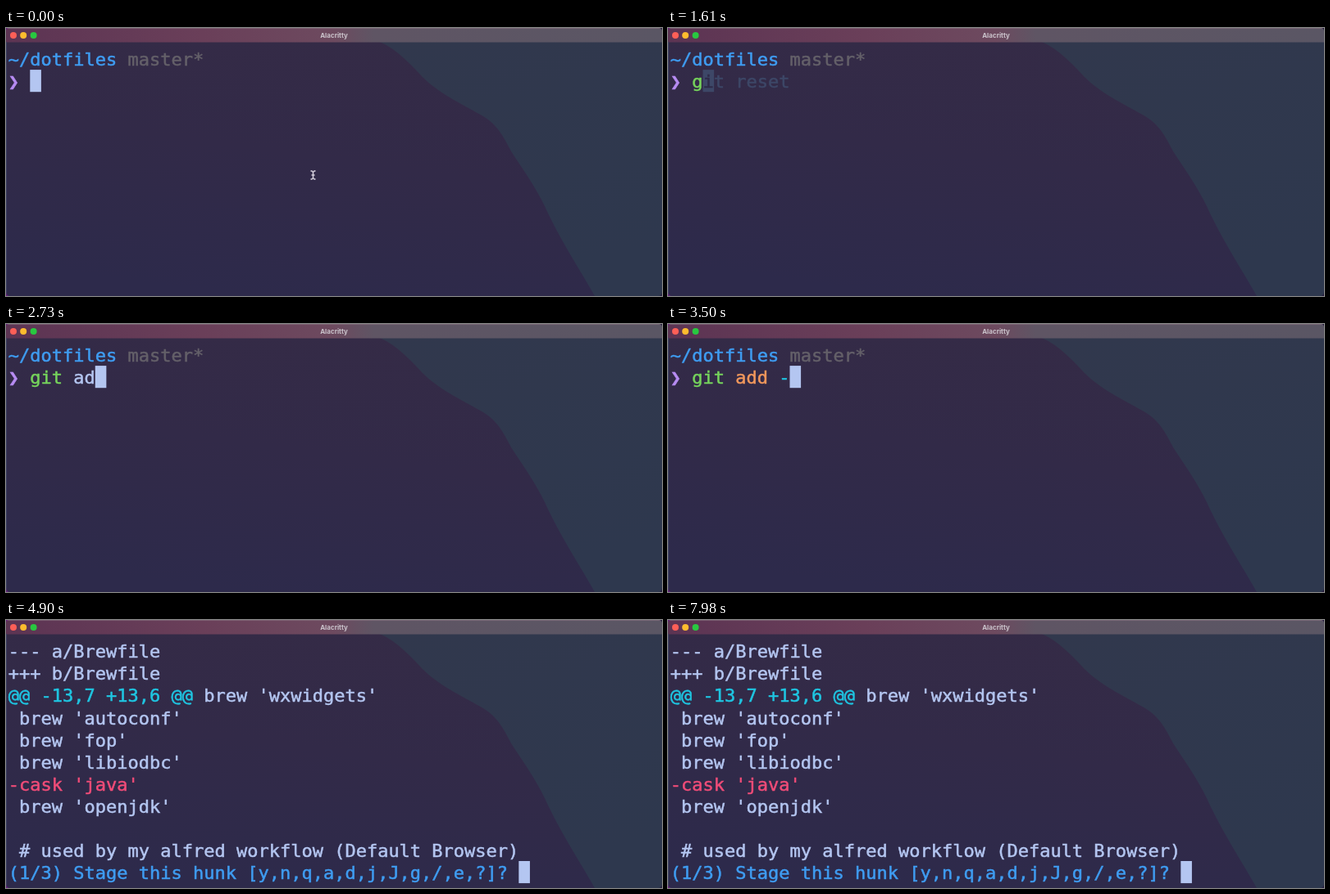
An HTML page for the animation above (8 s loop, 800 px wide and 328 px high).

```html
<!DOCTYPE html>
<html lang="en">
<head>
<meta charset="utf-8">
<title>Terminal</title>
<style>
  html, body { margin: 0; width: 100%; height: 100%; overflow: hidden; background: #302a49; }
  svg { display: block; width: 800px; height: 328px; }
  text { white-space: pre; }
  .term { font: 22px "DejaVu Sans Mono", "Noto Sans Mono", "Liberation Mono", monospace; font-variant-ligatures: none; fill: currentColor; }
  /* a thin outline gives a medium weight */
  .term text { stroke: currentColor; stroke-width: .5; }
  .title { font: 700 8px Inter, "Liberation Sans", sans-serif; fill: #cbc4cc; text-anchor: middle; }
  .fg { color: #b4c6f1; }
  .blue { color: #3f9df2; }
  .dim { color: #646069; }
  .mark { color: #b78cf2; }
  .cmd { color: #76d45c; }
  .sub { color: #f2985c; }
  .opt { color: #1fc6e2; }
  .red { color: #f04c78; }
  .hint { color: #3d4767; }
  .under { color: #2f2b49; }
  .pointer { fill: none; stroke: #d4cedb; stroke-width: 1.5; }
</style>
</head>
<body>
<svg viewBox="0 0 800 328">
  <defs>
    <linearGradient id="slope" x1=".7" y1="0" x2=".35" y2="1">
      <stop offset="0" stop-color="#352b46"/>
      <stop offset=".5" stop-color="#322a48"/>
      <stop offset="1" stop-color="#2d2a4b"/>
    </linearGradient>
    <linearGradient id="sky" x1="0" y1="0" x2=".3" y2="1">
      <stop offset="0" stop-color="#31384d"/>
      <stop offset="1" stop-color="#2e384e"/>
    </linearGradient>
    <linearGradient id="bar">
      <stop offset="0" stop-color="#5c3453"/>
      <stop offset=".3" stop-color="#6a3f59"/>
      <stop offset=".5" stop-color="#6d4a5f"/>
      <stop offset=".56" stop-color="#5f5564"/>
      <stop offset="1" stop-color="#5a5664"/>
    </linearGradient>
  </defs>
  <rect width="800" height="328" fill="url(#slope)"/>
  <path fill="url(#sky)" d="M456 17C478 27 494 45 508 60C530 82 562 96 582 108C603 121 609 139 618 154C634 178 645 194 657 218C675 258 700 296 718 328H800V17Z"/>
  <rect width="800" height="17.5" fill="url(#bar)"/>
  <rect width="800" height="1" fill="#8a7483" opacity=".6"/>
  <rect y="17" width="1" height="311" fill="#3d4264"/>
  <path fill="#65207c" d="M0 0H4Q0 0 0 4ZM0 328H5Q0 328 0 322Z"/>
  <path fill="#251c3d" d="M800 0H796Q800 0 800 4ZM800 328H795Q800 328 800 322Z"/>
  <circle cx="9" cy="9" r="4" fill="#fe5f57"/>
  <circle cx="21.2" cy="9" r="4" fill="#febc2e"/>
  <circle cx="33.6" cy="9" r="4" fill="#28c840"/>
  <text class="title" x="400" y="11.5">Alacritty</text>
  <g id="screen" class="term"></g>
  <path id="pointer" class="pointer" d="M371.5 175H373L374.5 176.5L376 175H377.5M374.5 176V184M371.5 185H373L374.5 183.5L376 185H377.5M372.5 180H376.5"/>
</svg>
<script>
const LOOP = 8000, CELL_W = 13.245, CELL_H = 27.1, LEFT = 2.8, TOP = 24, BASE = 22.2;
const TYPING_START = 1610;
const screen = document.getElementById('screen');
const pointer = document.getElementById('pointer');

function add(parent, name, attrs, text = '') {
  const node = document.createElementNS('http://www.w3.org/2000/svg', name);
  for (const key in attrs) node.setAttribute(key, attrs[key]);
  node.textContent = text;
  return parent.appendChild(node);
}

const xAt = col => LEFT + col * CELL_W;
const yAt = row => TOP + row * CELL_H;

// A row is a list of [class, text] runs laid out cell by cell.
function drawRow(group, row, runs, col = 0) {
  for (const [cls, text] of runs) {
    add(group, 'text', { class: cls, x: xAt(col), y: yAt(row) + BASE }, text);
    col += text.length;
  }
  return col;
}

function drawCursor(group, row, col, cls = 'fg') {
  add(group, 'rect', { class: cls, x: xAt(col), y: yAt(row), width: 13.6, height: CELL_H });
}

const header = [['blue', '~/dotfiles'], ['fg', ' '], ['dim', 'master*']];
const prompt = [['mark', '❯'], ['fg', ' ']];

function promptScreen(runs, hint = '') {
  return group => {
    drawRow(group, 0, header);
    const col = drawRow(group, 1, [...prompt, ...runs]);
    drawCursor(group, 1, col, hint ? 'hint' : 'fg');
    if (hint) drawRow(group, 1, [['under', hint[0]], ['hint', hint.slice(1)]], col);
  };
}

const git = ['cmd', 'git'], gap = ['fg', ' '], sub = ['sub', 'add'];
const fullCommand = [git, gap, sub, gap, ['opt', '-p']];

function tipScreen(group) {
  drawRow(group, 0, header);
  drawRow(group, 1, [...prompt, ...fullCommand]);
  drawRow(group, 2, [['blue', 'Alias tip: fap']]);
  drawCursor(group, 3, 0);
}

function diffScreen(group) {
  const rows = [
    [['fg', '--- a/Brewfile']],
    [['fg', '+++ b/Brewfile']],
    [['opt', '@@ -13,7 +13,6 @@'], ['fg', " brew 'wxwidgets'"]],
    [['fg', " brew 'autoconf'"]],
    [['fg', " brew 'fop'"]],
    [['fg', " brew 'libiodbc'"]],
    [['red', "-cask 'java'"]],
    [['fg', " brew 'openjdk'"]],
    [],
    [['fg', ' # used by my alfred workflow (Default Browser)']],
    [['blue', '(1/3) Stage this hunk [y,n,q,a,d,j,J,g,/,e,?]? ']]
  ];
  let end = 0;
  rows.forEach((runs, row) => { end = drawRow(group, row, runs); });
  drawCursor(group, rows.length - 1, end);
}

const steps = [
  [0, promptScreen([])],
  [TYPING_START, promptScreen([['cmd', 'g']], 'it reset')],
  [1820, promptScreen([['red', 'gi']], 't reset')],
  [1960, promptScreen([git], ' reset')],
  [2170, promptScreen([git, gap], 'reset')],
  [2450, promptScreen([git, gap, ['fg', 'a']])],
  [2660, promptScreen([git, gap, ['fg', 'ad']])],
  [2800, promptScreen([git, gap, sub])],
  [3010, promptScreen([git, gap, sub, gap])],
  [3290, promptScreen([git, gap, sub, gap, ['opt', '-']])],
  [3570, promptScreen(fullCommand)],
  [4270, tipScreen],
  [4620, diffScreen]
].map(([start, draw]) => {
  const group = add(screen, 'g', { display: 'none' });
  draw(group);
  return { start, group };
});

let shown = null;
function tick() {
  const t = performance.now() % LOOP;
  const { group } = steps.findLast(step => step.start <= t);
  if (group !== shown) {
    if (shown) shown.setAttribute('display', 'none');
    group.removeAttribute('display');
    shown = group;
    pointer.setAttribute('display', t < TYPING_START ? 'inline' : 'none');
  }
  requestAnimationFrame(tick);
}
tick();
</script>
</body>
</html>
```
